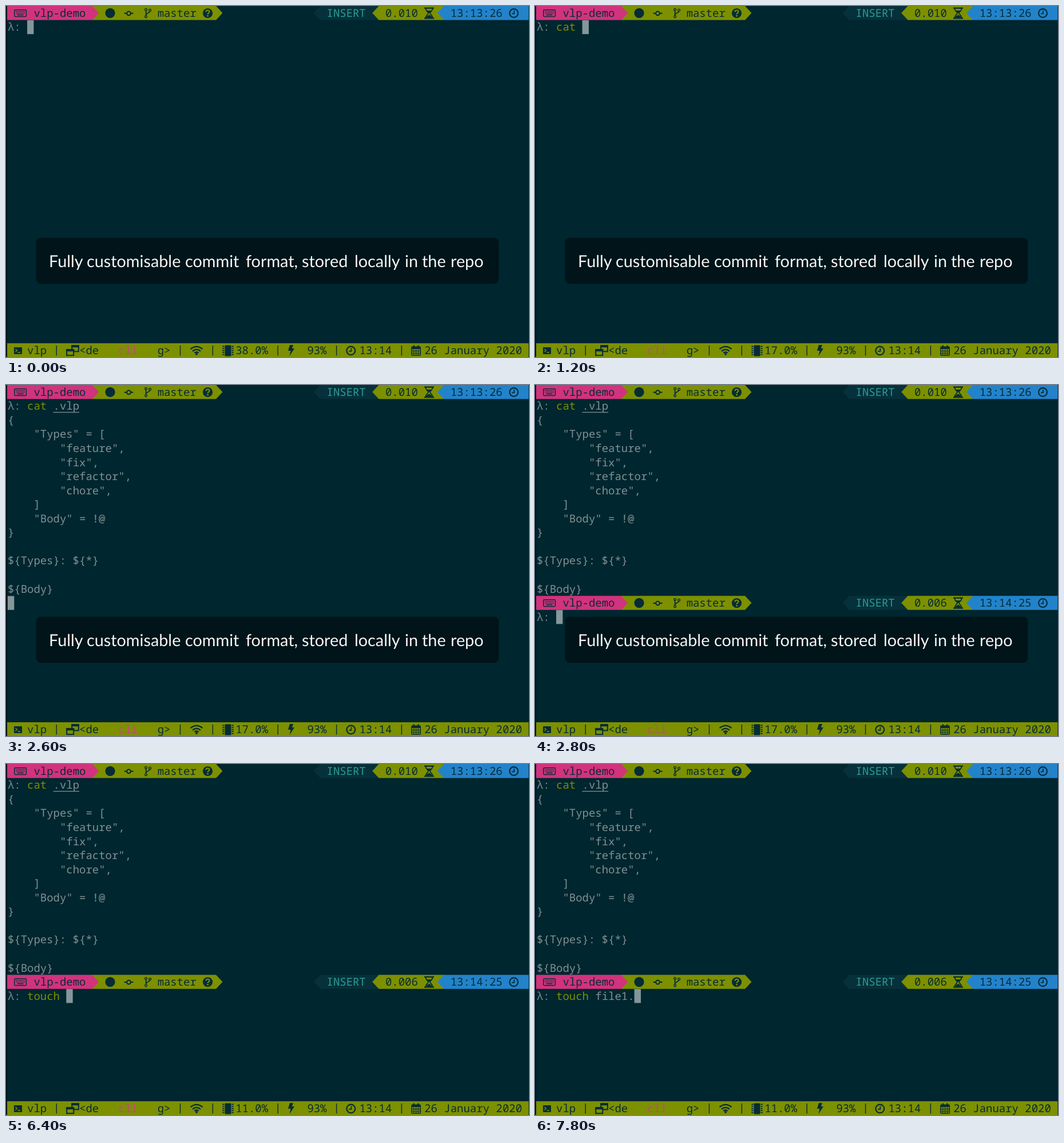
Recreate the animation shown at these times as an HTML page. Size 914 by 613 pixels, loop 8 s.

```html
<!DOCTYPE html>
<html lang="en">
<head>
<meta charset="utf-8">
<title>Terminal session</title>
<style>
  html, body { margin: 0; width: 100%; height: 100%; overflow: hidden; background: #00262f; }
  svg { display: block; width: 100vw; height: 100vh; }
  text { font: 300 18.97px "Noto Sans Mono", monospace; white-space: pre; text-rendering: geometricPrecision; }
  .caption text { font: 400 28.8px Lato, sans-serif; }
</style>
</head>
<body>
<svg id="stage" viewBox="0 0 914 613"></svg>
<script>
const NS = "http://www.w3.org/2000/svg";
const CW = 11.38, LH = 24.55, X0 = 2.9;
const BG = "#00262f", INK = "#062c36", GREY = "#7f9193", DIM = "#4b6269",
  GREEN = "#7d9000", PINK = "#d1337d", BLUE = "#2283cb", TEAL = "#2b9b94",
  SLATE = "#06313b", RED = "#cf3a30", CURSOR = "#84979a";

const stage = document.getElementById("stage");
const colX = c => X0 + c * CW;

function add(parent, tag, attrs, text) {
  const el = document.createElementNS(NS, tag);
  for (const k in attrs) el.setAttribute(k, attrs[k]);
  if (text !== undefined) el.textContent = text;
  parent.appendChild(el);
  return el;
}
const group = (parent, attrs = {}) => add(parent, "g", attrs);
const rect = (p, x, y, width, height, fill, rx = 0) => add(p, "rect", { x, y, width, height, fill, rx });
const fillPath = (p, d, fill = INK) => add(p, "path", { d, fill });
const linePath = (p, d, w = 1.5, stroke = INK) =>
  add(p, "path", { d, fill: "none", stroke, "stroke-width": w });
const disc = (p, cx, cy, r, fill = INK) => add(p, "circle", { cx, cy, r, fill });
const put = (p, col, row, str, fill = GREY) =>
  add(p, "text", { x: colX(col), y: row * LH + 18.8, fill }, str);

function clock(p, x, y) {
  add(p, "circle", { cx: x, cy: y, r: 7.4, fill: "none", stroke: INK, "stroke-width": 2.2 });
  linePath(p, `M${x + 0.6} ${y - 4.5}V${y + 0.8}H${x - 3.6}`, 1.7);
}

function keyboard(p) {
  add(p, "rect", { x: 14.8, y: 6.8, width: 20.6, height: 11.6, rx: 1.4,
    fill: "none", stroke: INK, "stroke-width": 1.5 });
  for (let r = 0; r < 2; r++)
    for (let i = 0; i < 6; i++) rect(p, 17.4 + i * 2.7 + r * 0.3, 9 + r * 2.8, 1.6, 1.6, INK);
  rect(p, 19.6, 14.7, 11, 1.6, INK);
}

function promptBar(parent, row, took, time) {
  const g = group(parent, { transform: `translate(0 ${row * LH})` });
  const h = LH, m = h / 2;
  const right = (a, b, fill) => fillPath(g, `M${a} 0H${colX(b)}L${colX(b + 1)} ${m}L${colX(b)} ${h}H${a}Z`, fill);
  const left = (a, b, fill) => fillPath(g, `M${b} 0H${colX(a + 1)}L${colX(a)} ${m}L${colX(a + 1)} ${h}H${b}Z`, fill);
  right(colX(13), 32, GREEN);
  right(2, 13, PINK);
  left(47, colX(57), SLATE);
  left(56, colX(67), GREEN);
  left(66, 913.3, BLUE);

  keyboard(g);
  put(g, 4, 0, "vlp-demo", INK);
  disc(g, 182, 12.3, 8.6);
  // commit node
  linePath(g, "M206.5 12.8H211M218 12.8H222.5", 2);
  add(g, "circle", { cx: 214.5, cy: 12.8, r: 3.4, fill: "none", stroke: INK, "stroke-width": 2 });
  // branch
  linePath(g, "M244.6 7V18M251.6 8.5C251.6 13 244.6 11.5 244.6 16", 1.7);
  for (const [x, y] of [[244.6, 6.3], [251.6, 7.3], [244.6, 18.6]])
    add(g, "circle", { cx: x, cy: y, r: 1.9, fill: GREEN, stroke: INK, "stroke-width": 1.3 });
  put(g, 23, 0, "master", INK);
  disc(g, 352.5, 12.5, 8.6);
  linePath(g, "M349.4 10.4C349.6 6.5 355.8 6.8 355.5 10.2C355.3 12.2 352.6 12.2 352.6 14.6", 2.1, GREEN);
  disc(g, 352.6, 17.2, 1.4, GREEN);

  put(g, 49, 0, "INSERT", TEAL);
  put(g, 58, 0, took, INK);
  // hourglass
  linePath(g, "M731 3.6H748M731 21.4H748", 2.3);
  linePath(g, "M733.4 4C733.4 9 738 10.5 738 12.5S733.4 16 733.4 21M745.6 4C745.6 9 741 10.5 741 12.5S745.6 16 745.6 21", 1.8);
  fillPath(g, "M735 8H744L739.5 12.5ZM734.5 20.5C735 17.5 738 16.5 739.5 15.5C741 16.5 744 17.5 744.5 20.5Z");
  put(g, 68, 0, time, INK);
  clock(g, 887.5, 12.5);
  return g;
}

function statusBar(parent) {
  const g = group(parent), row = 24;
  rect(g, 2, 589, 911.3, 24, GREEN);
  for (const c of [7, 26, 31, 41, 50, 60]) {
    const x = colX(c + 0.5);
    linePath(g, `M${x} 593V610.5`, 1.4);
  }
  // terminal
  rect(g, 14, 596, 14, 12, INK, 1);
  linePath(g, "M16.5 599L19.3 601.6L16.5 604.2M20.5 605H25", 1.4, GREEN);
  put(g, 3, row, "vlp", INK);
  // windows
  add(g, "rect", { x: 115.2, y: 593.2, width: 11.6, height: 10.2, fill: GREEN, stroke: INK, "stroke-width": 2 });
  rect(g, 114.2, 592.2, 13.6, 4, INK);
  add(g, "rect", { x: 106.2, y: 600.2, width: 12, height: 10, fill: GREEN, stroke: INK, "stroke-width": 2 });
  rect(g, 105.2, 599.2, 14, 4, INK);
  put(g, 11, row, "<de", INK);
  put(g, 17, row, "cli", "#c2477a");
  put(g, 23, row, "g>", INK);
  // signal
  linePath(g, "M322.5 599.2Q333 590.5 343.5 599.2M326 602.8Q333 597 340 602.8M329.4 606Q333 603 336.6 606", 2.3);
  disc(g, 333, 608, 1.9);
  // chip
  rect(g, 382.5, 592.5, 11, 19, INK, 1);
  for (let i = 0; i < 5; i++) {
    const y = 594.5 + i * 3.6;
    linePath(g, `M378.3 ${y}H381.4M394.6 ${y}H397.7`, 1.9);
  }
  // bolt
  fillPath(g, "M496 592H502L499.8 598H504L495.4 611.5L497.6 602H493Z");
  put(g, 46, row, "93%", INK);
  clock(g, 602.8, 602);
  put(g, 54, row, "13:14", INK);
  // calendar
  add(g, "rect", { x: 709, y: 595.2, width: 15.2, height: 14.8, rx: 1, fill: "none", stroke: INK, "stroke-width": 1.5 });
  rect(g, 709, 595, 15, 4, INK);
  linePath(g, "M712.8 592.5V597M720.4 592.5V597", 2.2);
  linePath(g, "M709 602.6H724M709 606.3H724M712.8 599V610M716.6 599V610M720.4 599V610", 1);
  put(g, 64, row, "26 January 2020", INK);
  return put(g, 35, row, "", INK);
}

function caption(parent) {
  const g = group(parent, { class: "caption" });
  rect(g, 52.7, 404.7, 808.5, 80.5, "#001419", 8);
  const words = [["Fully", 75], ["customisable", 141], ["commit", 313], ["format,", 419],
    ["stored", 517], ["locally", 609], ["in", 697], ["the", 727], ["repo", 777]];
  for (const [w, x] of words) add(g, "text", { x, y: 456, fill: "#f4f6f6" }, w);
  return g;
}

function listing(parent) {
  const g = group(parent);
  const rows = [
    [0, 2, "{"], [4, 3, '"Types" = ['], [8, 4, '"feature",'], [8, 5, '"fix",'],
    [8, 6, '"refactor",'], [8, 7, '"chore",'], [4, 8, "]"], [4, 9, '"Body" = !@'],
    [0, 10, "}"], [0, 12, "${Types}: ${*}"], [0, 14, "${Body}"]
  ];
  for (const [c, r, s] of rows) put(g, c, r, s);
  return g;
}

function cursor(p, col, row) {
  rect(p, colX(col), row * LH + 0.3, CW, LH - 0.3, CURSOR);
}

// Prompt with typed text, an optional dim suggestion and a cursor.
function commandLine(p, row, typed, hint, active) {
  put(p, 0, row, "λ:", "#748a8c");
  const end = 3 + typed.length;
  if (active) cursor(p, end, row);
  const [cmd, ...rest] = typed.split(" ");
  const known = cmd === "cat" || cmd === "touch";
  put(p, 3, row, cmd, known ? GREEN : RED);
  const arg = rest.join(" "), at = 4 + cmd.length;
  if (arg) put(p, at, row, arg);
  if (arg && cmd === "cat") {
    const y = row * LH + 23;
    linePath(p, `M${colX(at)} ${y}H${colX(at + arg.length)}`, 1.2, GREY);
  }
  if (hint) {
    put(p, end, row, hint[0], BG);
    put(p, end + 1, row, hint.slice(1), DIM);
  }
}

const LOOP = 8000;
const first = [[0, ""], [800, "c"], [1000, "ca"], [1200, "cat "], [1400, "cat ."],
  [1600, "cat .v"], [1800, "cat .vl"], [2000, "cat .vlp"]];
const second = [[0, ""], [5800, "t"], [6000, "tou", "ch file"], [6200, "touch"], [6400, "touch "],
  [6800, "touch f", "ile"], [7000, "touch fil", "e"], [7200, "touch file"],
  [7600, "touch file1"], [7800, "touch file1."]];
const load = [[0, "38.0%"], [600, "17.0%"], [5600, "11.0%"]];
const PRINTED = 2600, PROMPTED = 2800, CAPTION_END = 5400;

const latest = (steps, t) => steps.filter(s => s[0] <= t).pop();
const show = (el, on) => el.setAttribute("display", on ? "inline" : "none");

rect(stage, 0, 0, 914, 613, BG);
promptBar(stage, 0, "0.010", "13:13:26");
const output = listing(stage);
const nextBar = promptBar(stage, 15, "0.006", "14".replace("14", "13:14:25"));
const lines = group(stage);
const usage = statusBar(stage);
const note = caption(stage);
rect(stage, 0, 0, 1.6, 613, "#000d11");

function render(t) {
  const [, cat] = latest(first, t);
  const [, touch, hint] = latest(second, t);
  lines.replaceChildren();
  commandLine(lines, 1, cat, "", t < PRINTED);
  if (t >= PROMPTED) commandLine(lines, 16, touch, hint, true);
  else if (t >= PRINTED) cursor(lines, 0, 15);
  show(output, t >= PRINTED);
  show(nextBar, t >= PROMPTED);
  show(note, t < CAPTION_END);
  usage.textContent = latest(load, t)[1];
}

const start = performance.now();
function tick() {
  render((performance.now() - start) % LOOP);
  requestAnimationFrame(tick);
}
render(0);
requestAnimationFrame(tick);
</script>
</body>
</html>
```
